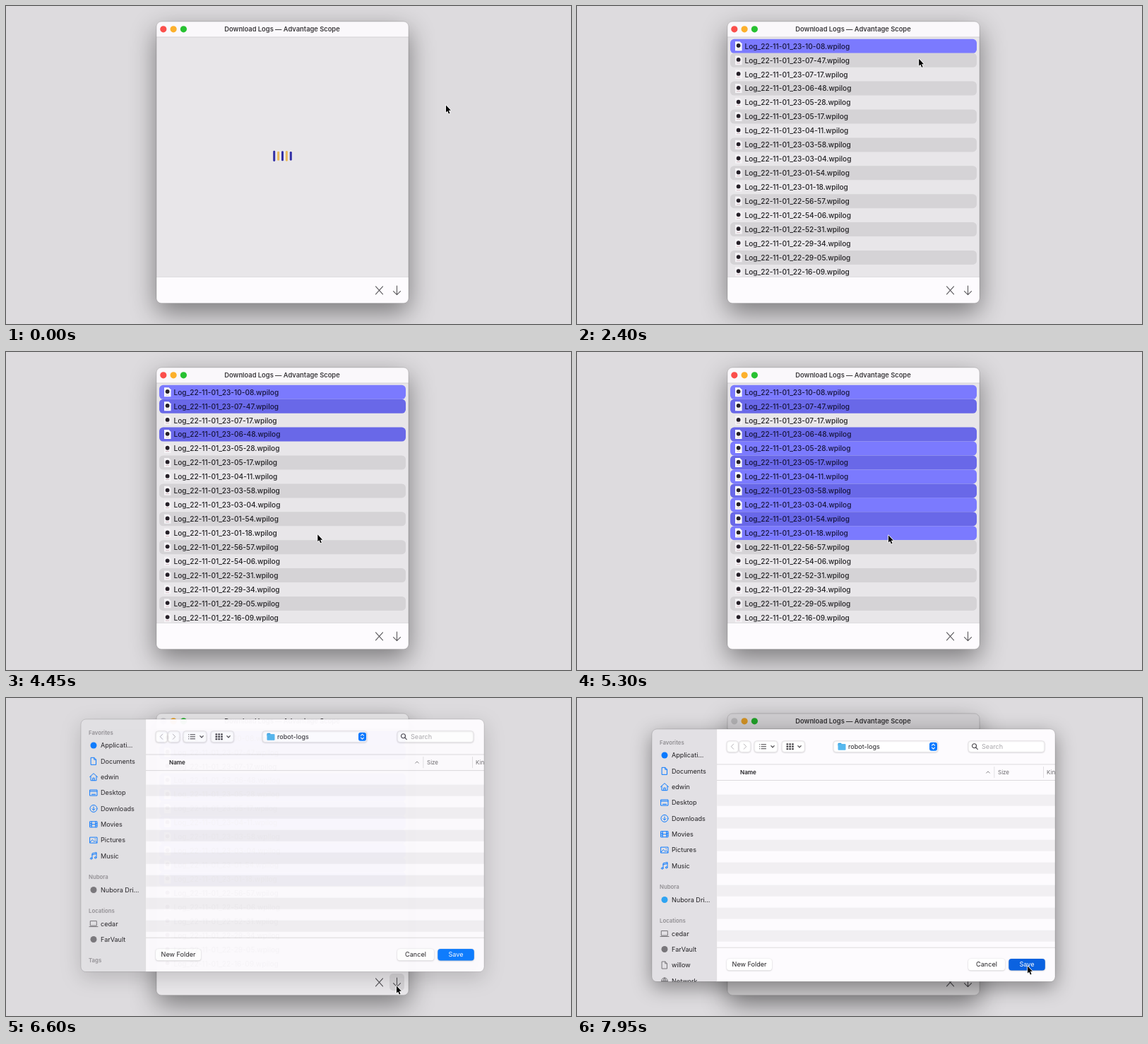
Recreate the animation shown at these times as an HTML page with a canvas. Size 800 by 450 pixels, loop 8000 ms.

```html
<!DOCTYPE html>
<html lang="en">
<head>
<meta charset="utf-8">
<title>Download Logs</title>
<style>
html, body { margin: 0; width: 800px; height: 450px; overflow: hidden; background: #dddbde; }
canvas { display: block; }
</style>
</head>
<body>
<canvas id="stage" width="800" height="450"></canvas>
<script>
const stage = document.getElementById('stage').getContext('2d');
const layer = document.createElement('canvas');
layer.width = 800;
layer.height = 450;
const sheetCtx = layer.getContext('2d');
let c = stage;

const LOOP = 8000, SHEET_AT = 6500, SHEET_H = 357.5;
const BLUE = '#0a7aff', GRAY = '#78767a', INK = '#222124';
const logs = ('01_23-10-08 01_23-07-47 01_23-07-17 01_23-06-48 01_23-05-28 01_23-05-17 ' +
  '01_23-04-11 01_23-03-58 01_23-03-04 01_23-01-54 01_23-01-18 01_22-56-57 01_22-54-06 ' +
  '01_22-52-31 01_22-29-34 01_22-29-05 01_22-16-09').split(' ');

// time, x, y of the pointer tip
const pointer = [
  [1000, 623, 140], [1350, 513, 41], [1700, 490, 54], [1950, 490, 54], [2450, 484, 75],
  [2650, 484, 75], [3150, 474, 114], [3350, 474, 114], [4150, 443, 252], [4550, 441, 259],
  [5450, 441, 259], [6050, 553, 407], [7300, 553, 407], [7800, 638, 379]
];

const icons = {
  doc: 'M-3.5 -5H.8L3.5 -2.2V5H-3.5ZM.8 -5V-2.2H3.5',
  home: 'M-5.5 0L0 -5L5.5 0M-4 -1V5H4V-1M-1.2 5V1.5H1.2V5',
  desktop: 'M-5 -4H5V4H-5ZM-5 -2H5M-2.5 2.2H2.5',
  down: 'M5 0A5 5 0 1 1 -5 0A5 5 0 1 1 5 0M0 -2.5V2.3M-2 .4L0 2.4L2 .4',
  film: 'M-5 -4H5V4H-5ZM-2.8 -4V4M2.8 -4V4M-2.8 0H2.8M-5 -1.3H-2.8M-5 1.3H-2.8M2.8 -1.3H5M2.8 1.3H5',
  picture: 'M-5 -4H5V4H-5ZM-5 3L-1.8 -.6L.8 2L2.2 .8L5 3.4M2 -1.8h.6',
  music: 'M-2 3.5V-3.5L4 -5V2.3M-2 -1.6L4 -3.1M-2 3.6a1.3 1.1 0 1 1 -.1 -.4M4 2.4a1.3 1.1 0 1 1 -.1 -.4',
  laptop: 'M-4.3 -4H4.3V2.6H-4.3ZM-6 4H6',
  globe: 'M4.5 0A4.5 4.5 0 1 1 -4.5 0A4.5 4.5 0 1 1 4.5 0M-4.5 0H4.5M0 -4.5V4.5M0 -4.5Q-4.5 0 0 4.5Q4.5 0 0 -4.5'
};

const favorites = [['dot', 'Applicati…'], ['doc', 'Documents'], ['home', 'edwin'], ['desktop', 'Desktop'],
  ['down', 'Downloads'], ['film', 'Movies'], ['picture', 'Pictures'], ['music', 'Music']];

const clamp = v => Math.max(0, Math.min(1, v));
const smooth = p => p * p * (3 - 2 * p);

function box(x, y, w, h, r, fill, stroke) {
  c.beginPath();
  c.roundRect(x, y, w, h, r);
  if (fill) { c.fillStyle = fill; c.fill(); }
  if (stroke) { c.strokeStyle = stroke; c.lineWidth = 0.7; c.stroke(); }
}

function rect(x, y, w, h, fill) {
  c.fillStyle = fill;
  c.fillRect(x, y, w, h);
}

function disc(x, y, r, fill) {
  c.beginPath();
  c.arc(x, y, r, 0, 7);
  c.fillStyle = fill;
  c.fill();
}

function line(d, x, y, color, width = 1) {
  c.save();
  c.translate(x, y);
  c.strokeStyle = color;
  c.lineWidth = width;
  c.lineCap = c.lineJoin = 'round';
  c.stroke(new Path2D(d));
  c.restore();
}

// y is the middle of the capitals
function text(s, x, y, size, color = INK, weight = 400, align = 'left') {
  c.font = `${weight} ${size}px Inter, "Open Sans", sans-serif`;
  c.textAlign = align;
  c.fillStyle = color;
  c.fillText(s, x, y + size * 0.36);
}

function shadow(alpha, blur, dy, draw) {
  c.save();
  c.shadowColor = `rgba(0,0,0,${alpha})`;
  c.shadowBlur = blur;
  c.shadowOffsetY = dy;
  draw();
  c.restore();
}

function isSelected(i, t) {
  const at = i === 0 ? 1950 : i === 1 ? 2650 : i === 3 ? 3350 : i > 3 && i < 11 ? 4750 : Infinity;
  return t >= at;
}

function drawRow(name, i, t) {
  const y = 57 + i * 19.94, odd = i % 2, on = isSelected(i, t);
  if (on || odd) box(217, y - 10.2, 349, 20, 5.5, on ? (odd ? '#6968e8' : '#7b7afe') : '#d5d3d6');
  c.fillStyle = on ? '#fff' : '#f5f3f6';
  c.fill(new Path2D(`M224 ${y - 6.8}h6.5l3 3v10h-9.5z`));
  disc(228.6, y - 1, 2.9, '#262028');
  rect(226, y + 3.6, 5, 0.7, '#c9a5ae');
  text(`Log_22-11-${name}.wpilog`, 237.5, y, 10.1, on ? '#15143a' : INK, 500);
}

function drawLoader(t) {
  for (let i = 0; i < 5; i++) {
    const h = 14 + 1.2 * Math.cos(t / 1000 * Math.PI * 2 - i * 2.4);
    box(378.2 + i * 5.9, 212.3 - h / 2, 3, h, 1.4, i % 2 ? '#e9bb5c' : '#3230a6');
  }
}

function drawWindow(t, dim) {
  shadow(0.45, 36, 13, () => box(213, 22, 357, 398.5, 7, '#e8e6e9'));
  c.save();
  c.beginPath();
  c.roundRect(213, 22, 357, 398.5, 7);
  c.clip();
  rect(213, 22, 357, 22, '#faf8fb');
  if (t < 600) drawLoader(t);
  else logs.forEach((name, i) => drawRow(name, i, t));
  rect(213, 43.6, 357, 0.8, '#cdcbce');
  rect(213, 383, 357, 38, '#fdfbfe');
  rect(213, 383, 357, 0.8, '#d8d6d9');

  [t >= SHEET_AT ? '#d8d6d9' : '#fb4f4b', '#fcb02c', '#27c131']
    .forEach((color, i) => disc(222.8 + i * 14.3, 32.8, 4.6, color));
  text('Download Logs — Advantage Scope', 391, 32.6, 9.33, '#3d3b3e', 600, 'center');

  if (t >= 6000 && t < 7450) box(543, 390, 21, 24, 5, t >= 6200 && t < 6350 ? '#d6d4d7' : '#e7e5e8');
  line('M-5 -5.5L5 5.5M5 -5.5L-5 5.5', 528.5, 402.3, '#59575b', 1.1);
  line('M0 -6.3V6.3M-5 1.3L0 6.3L5 1.3', 553.5, 402.3, '#59575b', 1.1);
  rect(213, 22, 357, 399, `rgba(0,0,0,${dim})`);
  c.restore();
  box(213, 22, 357, 398.5, 7, null, 'rgba(0,0,0,.22)');
}

function drawItem(icon, label, y, color = BLUE) {
  if (icon === 'dot') disc(124, y, 4.5, color);
  else line(icons[icon], 124, y, color);
  text(label, 134, y, 9.1);
}

function drawSidebar(t) {
  const head = (s, y) => text(s, 117, y, 7.8, '#929094', 600);
  const loaded = t >= 7000;
  head('Favorites', 19);
  favorites.forEach(([icon, label], i) => drawItem(icon, label, 37 + i * 22.35));
  head('Nubora', 223.5);
  drawItem('dot', 'Nubora Dri…', 241.5, loaded ? '#2fa4f2' : GRAY);
  head('Locations', 271.5);
  drawItem('laptop', 'cedar', 289.5, GRAY);
  drawItem('dot', 'FarVault', 311.5, GRAY);
  if (loaded) {
    drawItem('doc', 'willow', 334, GRAY);
    drawItem('globe', 'Network', 356.5, GRAY);
  } else head('Tags', 341.5);
}

function drawButton(label, x, w, fill = '#fff', color = INK) {
  shadow(0.25, 2, 0.5, () => box(x, 325, w, 16.5, 4, fill));
  text(label, x + w / 2, 333.2, 9.1, color, 400, 'center');
}

function drawToolbar() {
  const edge = '#e2e0e3', mid = 24.7;
  [[212, 16.5], [229.5, 16.5], [251, 33], [290, 32.5], [363, 148], [554, 108]].forEach(([x, w]) =>
    shadow(0.14, 2, 0.5, () => box(x, mid - 8, w, 16, 4, '#fff', edge)));
  line('M1.7 -3.6L-1.7 0L1.7 3.6', 220, mid, '#b9b7ba');
  line('M-1.7 -3.6L1.7 0L-1.7 3.6', 238, mid, '#b9b7ba');
  line('M-4.5 -3h.2M-4.5 0h.2M-4.5 3h.2M-2 -3H4.5M-2 0H4.5M-2 3H4.5', 263, mid, '#444246', 1.1);
  for (let i = 0; i < 9; i++)
    box(296.5 + i % 3 * 3.8, mid - 4.5 + Math.floor(i / 3) * 3.4, 2.7, 2.3, 0.5, '#4b494d');
  [277, 315].forEach(x => line('M-2.2 -1L0 1.2L2.2 -1', x, mid, '#444246', 1.2));

  box(369.5, mid - 5, 5, 4, 1, '#2f9bdc');
  box(369.5, mid - 3.8, 11, 8.8, 1, '#56b8ee');
  text('robot-logs', 384, mid, 9.1);
  box(499, mid - 6, 11, 12, 3, BLUE);
  line('M-2 -1.5L0 -3.5L2 -1.5M-2 1.5L0 3.5L2 1.5', 504.5, mid, '#fff', 1.1);

  line('M2.5 -1A3 3 0 1 1 -3.5 -1A3 3 0 1 1 2.5 -1M1.8 1.4L4.3 4', 563, mid, '#444246', 1.1);
  text('Search', 573, mid, 9.1, '#aaa8ac');
}

function drawSheet(t) {
  c.clearRect(0, 0, 800, 450);
  c.save();
  c.beginPath();
  c.roundRect(106, 0, 571, SHEET_H, 7);
  c.clip();
  rect(106, 0, 92, SHEET_H, '#e2e0e4');
  rect(197.5, 0, 480, SHEET_H, '#fdfbfe');
  rect(197.5, 0, 0.6, SHEET_H, '#d3d1d4');
  drawSidebar(t);
  drawToolbar();

  for (let i = 0; i < 7; i++) rect(198, 92.6 + i * 32, 480, 16, '#f1eff2');
  [49.5, 72, 308.7].forEach(y => rect(198, y, 480, 0.9, '#d9d7da'));
  [590.5, 660].forEach(x => rect(x, 53, 0.8, 16, '#dbd9dc'));
  text('Name', 231, 61, 8.1, INK, 600);
  line('M-2.3 1.1L0 -1.2L2.3 1.1', 582, 61, '#78767a', 0.9);
  text('Size', 596, 61, 8, '#6c6a6e');
  text('Kind', 665, 61, 8, '#6c6a6e');

  drawButton('New Folder', 212, 64);
  drawButton('Cancel', 554, 52);
  // the default button turns blue once the sheet has focus
  const focused = t >= SHEET_AT + 50;
  drawButton('Save', 611.3, 51.5, !focused ? '#f6f4f7' : t >= 7900 ? '#0b62e0' : BLUE, focused ? '#fff' : '#aaa8ac');
  c.restore();
}

function drawPointer(t) {
  let k = pointer.findIndex(p => p[0] > t);
  if (k < 0) k = pointer.length;
  const a = pointer[Math.max(0, k - 1)], b = pointer[Math.min(k, pointer.length - 1)];
  const p = b[0] > a[0] ? smooth(clamp((t - a[0]) / (b[0] - a[0]))) : 0;
  const arrow = 'M0 0V10L2.2 8L3.9 12L5.5 11.3L3.8 7.3H6.9Z';
  c.save();
  c.translate(a[1] + (b[1] - a[1]) * p, a[2] + (b[2] - a[2]) * p + 0.4);
  c.lineWidth = 1.5;
  c.lineJoin = 'round';
  c.strokeStyle = '#fff';
  c.stroke(new Path2D(arrow));
  c.fillStyle = '#000';
  c.fill(new Path2D(arrow));
  c.restore();
}

function draw(t) {
  const left = 1 - clamp((t - SHEET_AT) / 400);
  const slide = 1 - left * left;
  c = stage;
  rect(0, 0, 800, 450, '#dddbde');
  drawWindow(t, 0.18 * slide);
  if (t >= SHEET_AT) {
    const top = 19 + 25 * slide;
    c = sheetCtx;
    drawSheet(t);
    c = stage;
    c.globalAlpha = clamp(0.06 + 0.9 * (t - SHEET_AT) / 100);
    shadow(0.4 * slide, 28, 8, () => c.drawImage(layer, 0, top));
    box(106, top, 571, SHEET_H, 7, null, 'rgba(0,0,0,.2)');
    c.globalAlpha = 1;
  }
  drawPointer(t);
}

const start = performance.now();
function tick() {
  draw((performance.now() - start) % LOOP);
  requestAnimationFrame(tick);
}
tick();
</script>
</body>
</html>
```
